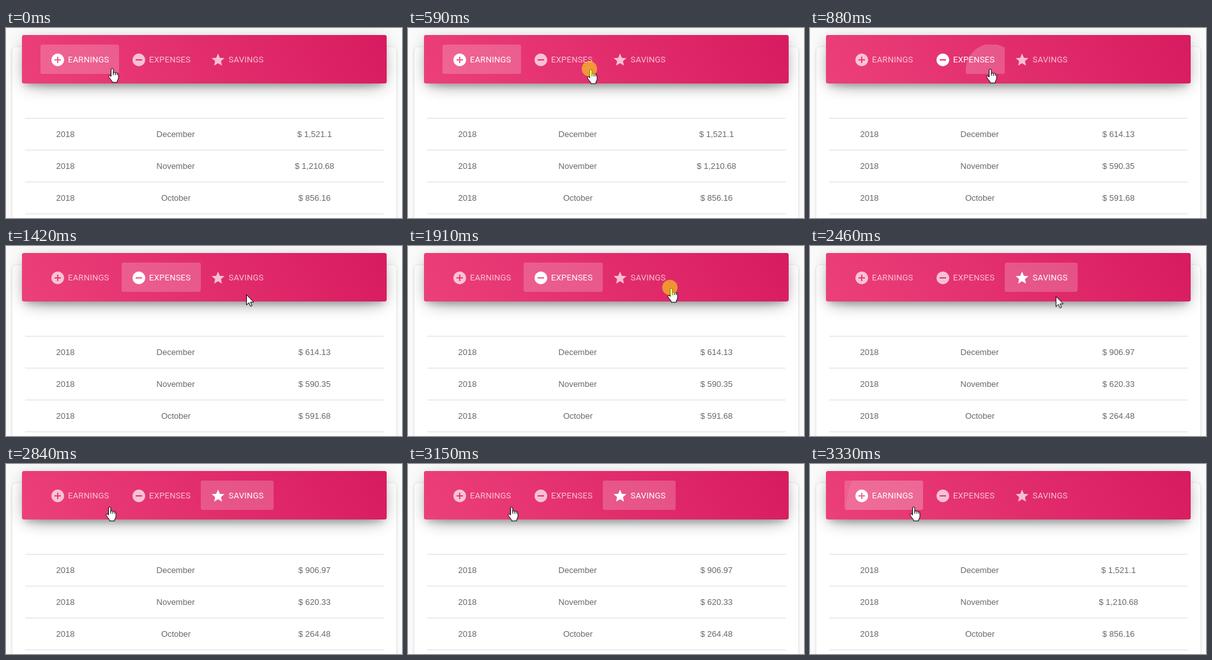
These frames come from a looping animation (620 by 298 pixels, 3760 ms). An HTML page:

```html
<!DOCTYPE html>
<html lang="en">
<head>
<meta charset="utf-8">
<title>Budget tabs</title>
<style>
  html, body { margin: 0; width: 100%; height: 100%; overflow: hidden; background: #fafafa; }
  .stage { position: relative; width: 620px; height: 298px; overflow: hidden; }
  .stage > * { position: absolute; }

  .card {
    left: 10px; top: 30px; width: 601px; height: 300px;
    background: #fff; border-radius: 6px;
    box-shadow: 0 1px 4px rgba(0, 0, 0, .16);
  }
  .bar {
    left: 25px; top: 11px; width: 571px; height: 76px;
    border-radius: 3px;
    background: linear-gradient(60deg, #ec407a, #d81b60);
    box-shadow: 0 10px 30px -12px rgba(0, 0, 0, .42),
                0 4px 25px rgba(0, 0, 0, .12),
                0 8px 10px -5px rgba(0, 0, 0, .2);
  }

  /* Every animated part shares one clock. */
  .tab::before, .tab::after, .on, .move-x, .move-y, .hand, .arrow, .halo {
    animation: 3.76s linear infinite;
  }

  .tab { top: 26px; height: 46px; border-radius: 3px; overflow: hidden; }
  .tab::before, .tab::after { content: ""; position: absolute; background: #fff; opacity: 0; }
  .tab::before { inset: 0; }
  .tab::after {
    left: calc(var(--x) - 100px); top: calc(var(--y) - 100px);
    width: 200px; height: 200px; border-radius: 50%;
  }
  .tab.earnings { left: 54px; width: 123px; --x: 107px; --y: 42px; }
  .tab.expenses { left: 181px; width: 124px; --x: 103px; --y: 39px; }
  .tab.savings { left: 305px; width: 114px; --x: 107px; --y: 40px; }

  .earnings::before { animation-name: fill-earnings; }
  .expenses::before { animation-name: fill-expenses; }
  .savings::before { animation-name: fill-savings; }
  .earnings::after { animation-name: ripple-earnings; }
  .expenses::after { animation-name: ripple-expenses; }
  .savings::after { animation-name: ripple-savings; }

  @keyframes fill-earnings {
    0%, 21.28% { opacity: .2; }
    23.3%, 86.86% { opacity: 0; }
    88.56%, 100% { opacity: .18; }
  }
  @keyframes fill-expenses {
    0%, 24.2% { opacity: 0; }
    28.19%, 53.19% { opacity: .2; }
    55.2%, 100% { opacity: 0; }
  }
  @keyframes fill-savings {
    0%, 55.21% { opacity: 0; }
    56.91%, 59.04% { opacity: .16; }
    60.64%, 84.84% { opacity: .2; }
    86.8%, 100% { opacity: 0; }
  }
  @keyframes ripple-earnings {
    0%, 85.8% { opacity: 0; transform: scale(0); }
    85.81% { opacity: .2; transform: scale(0); }
    86.86% { opacity: .2; transform: scale(.4); }
    88.56%, 100% { opacity: .09; transform: scale(1.04); }
  }
  @keyframes ripple-expenses {
    0%, 22.33% { opacity: 0; transform: scale(0); }
    22.34% { opacity: .2; transform: scale(0); }
    23.4%, 24.2% { opacity: .2; transform: scale(.4); }
    24.25% { opacity: .18; transform: scale(.7); }
    25.53% { opacity: .11; transform: scale(1.1); }
    28.19%, 100% { opacity: 0; transform: scale(1.6); }
  }
  @keyframes ripple-savings {
    0%, 54.14% { opacity: 0; transform: scale(0); }
    54.15% { opacity: .2; transform: scale(0); }
    55.21% { opacity: .2; transform: scale(.4); }
    56.91%, 59.04% { opacity: .1; transform: scale(1.04); }
    60.64%, 100% { opacity: 0; transform: scale(1.3); }
  }

  /* Labels dim when unselected, amounts disappear. */
  .on { animation-timing-function: step-end; }
  .label { --off: .7; fill: #fff; font: 13px Roboto, sans-serif; letter-spacing: .25px; }
  .amounts { --off: 0; }
  .on.earnings { animation-name: on-earnings; }
  .on.expenses { animation-name: on-expenses; }
  .on.savings { animation-name: on-savings; }
  @keyframes on-earnings {
    0% { opacity: 1; }
    21.28% { opacity: var(--off); }
    84.84%, 100% { opacity: 1; }
  }
  @keyframes on-expenses {
    0% { opacity: var(--off); }
    21.28% { opacity: 1; }
    53.19%, 100% { opacity: var(--off); }
  }
  @keyframes on-savings {
    0% { opacity: var(--off); }
    53.19% { opacity: 1; }
    84.84%, 100% { opacity: var(--off); }
  }

  .table { fill: #696969; font: 13px "Liberation Sans", Arial, sans-serif; text-anchor: middle; }
  .rules { stroke: #ddd; }

  .pointer { fill: #fff; stroke: #000; stroke-linejoin: round; }
  .move-x { animation-name: move-x; }
  .move-y { animation-name: move-y; }
  @keyframes move-x {
    0% { transform: translateX(165px); }
    2.93% { transform: translateX(165px); animation-timing-function: ease-in-out; }
    15.69%, 19.41% { transform: translateX(285px); }
    23.4% { transform: translateX(281px); }
    32.45% { transform: translateX(281px); animation-timing-function: ease-in; }
    37.76% { transform: translateX(376px); }
    39.1% { transform: translateX(376px); animation-timing-function: ease-out; }
    42.55% { transform: translateX(411px); }
    62.5% { transform: translateX(411px); animation-timing-function: ease-in-out; }
    75.53%, 100% { transform: translateX(161px); }
  }
  @keyframes move-y {
    0% { transform: translateY(63px); }
    2.93% { transform: translateY(63px); animation-timing-function: ease-in-out; }
    9.3% { transform: translateY(90px); animation-timing-function: ease-in-out; }
    15.69%, 19.41% { transform: translateY(65px); }
    23.4% { transform: translateY(64px); }
    32.45% { transform: translateY(64px); animation-timing-function: ease-in; }
    37.76% { transform: translateY(76px); }
    39.1% { transform: translateY(76px); animation-timing-function: ease-out; }
    42.55% { transform: translateY(66px); }
    62.5% { transform: translateY(66px); animation-timing-function: ease-in-out; }
    69% { transform: translateY(96px); animation-timing-function: ease-in-out; }
    75.53%, 100% { transform: translateY(67px); }
  }

  .hand, .arrow, .halo { animation-timing-function: step-end; }
  .hand { animation-name: inside; }
  .arrow { animation-name: outside; }
  .halo { animation-name: press; fill: #ff0; fill-opacity: .5; }
  @keyframes inside {
    0%, 13.2%, 40.5%, 73.4%, 100% { opacity: 1; }
    5.5%, 35.8%, 64.6% { opacity: 0; }
  }
  @keyframes outside {
    0%, 13.2%, 40.5%, 73.4%, 100% { opacity: 0; }
    5.5%, 35.8%, 64.6% { opacity: 1; }
  }
  @keyframes press {
    0%, 19.41%, 51.3%, 82.45%, 100% { opacity: 0; }
    15.69%, 47.6%, 78.72% { opacity: 1; }
  }
</style>
</head>
<body>
<div class="stage">
  <div class="card"></div>
  <div class="bar"></div>
  <div class="tab earnings"></div>
  <div class="tab expenses"></div>
  <div class="tab savings"></div>

  <svg width="620" height="298" viewBox="0 0 620 298">
    <g class="label on earnings">
      <path transform="translate(69 38)" fill-rule="evenodd"
        d="M12 2a10 10 0 1 0 0 20 10 10 0 0 0 0-20zM17 13h-4v4h-2v-4H7v-2h4V7h2v4h4z"/>
      <text x="97" y="54">EARNINGS</text>
    </g>
    <g class="label on expenses">
      <path transform="translate(196 38)" fill-rule="evenodd"
        d="M12 2a10 10 0 1 0 0 20 10 10 0 0 0 0-20zM17 13H7v-2h10z"/>
      <text x="224" y="54">EXPENSES</text>
    </g>
    <g class="label on savings">
      <path transform="translate(320 38)"
        d="M12 17.27 18.18 21l-1.64-7.03L22 9.24l-7.19-.61L12 2 9.19 8.63 2 9.24l5.46 4.73L5.82 21z"/>
      <text x="348.5" y="54">SAVINGS</text>
    </g>

    <path class="rules" d="M30 141.5h561M30 191.5h561M30 241.5h561M30 291.5h561"/>
    <g class="table">
      <text x="93" y="171">2018</text>
      <text x="93" y="221">2018</text>
      <text x="93" y="271">2018</text>
      <text x="265.5" y="171">December</text>
      <text x="265.5" y="221">November</text>
      <text x="266" y="271">October</text>
      <g class="amounts on earnings">
        <text x="483" y="171">$ 1,521.1</text>
        <text x="483" y="221">$ 1,210.68</text>
        <text x="483" y="271">$ 856.16</text>
      </g>
      <g class="amounts on expenses">
        <text x="483" y="171">$ 614.13</text>
        <text x="483" y="221">$ 590.35</text>
        <text x="483" y="271">$ 591.68</text>
      </g>
      <g class="amounts on savings">
        <text x="483" y="171">$ 906.97</text>
        <text x="483" y="221">$ 620.33</text>
        <text x="483" y="271">$ 264.48</text>
      </g>
    </g>

    <g class="move-x"><g class="move-y">
      <g class="pointer hand">
        <path transform="translate(-6 0)"
          d="M5.5 13V2q0-1.5 1.75-1.5T9 2v5.5q0-1 1.6-1t1.6 1.3q.2-.8 1.5-.8t1.4 1.4q.2-.5 1-.3 1 .2 1 1.6v5q0 2-1 3.5l-1 2v2h-8v-1.5l-4.5-6q-1.6-2.4-.5-3.3 1.3-.9 3.4 1.6z"/>
        <path transform="translate(-6 0)" fill="none" d="M9 7v4M12.2 7.8V11M15.1 8.4V11"/>
      </g>
      <path class="pointer arrow" d="M.5.5v16l3.8-3.6 2.5 5.6 2.5-1.1-2.5-5.4h5.2z"/>
      <circle class="halo" cx="-1" cy="-1" r="12"/>
    </g></g>
  </svg>
</div>
</body>
</html>
```
